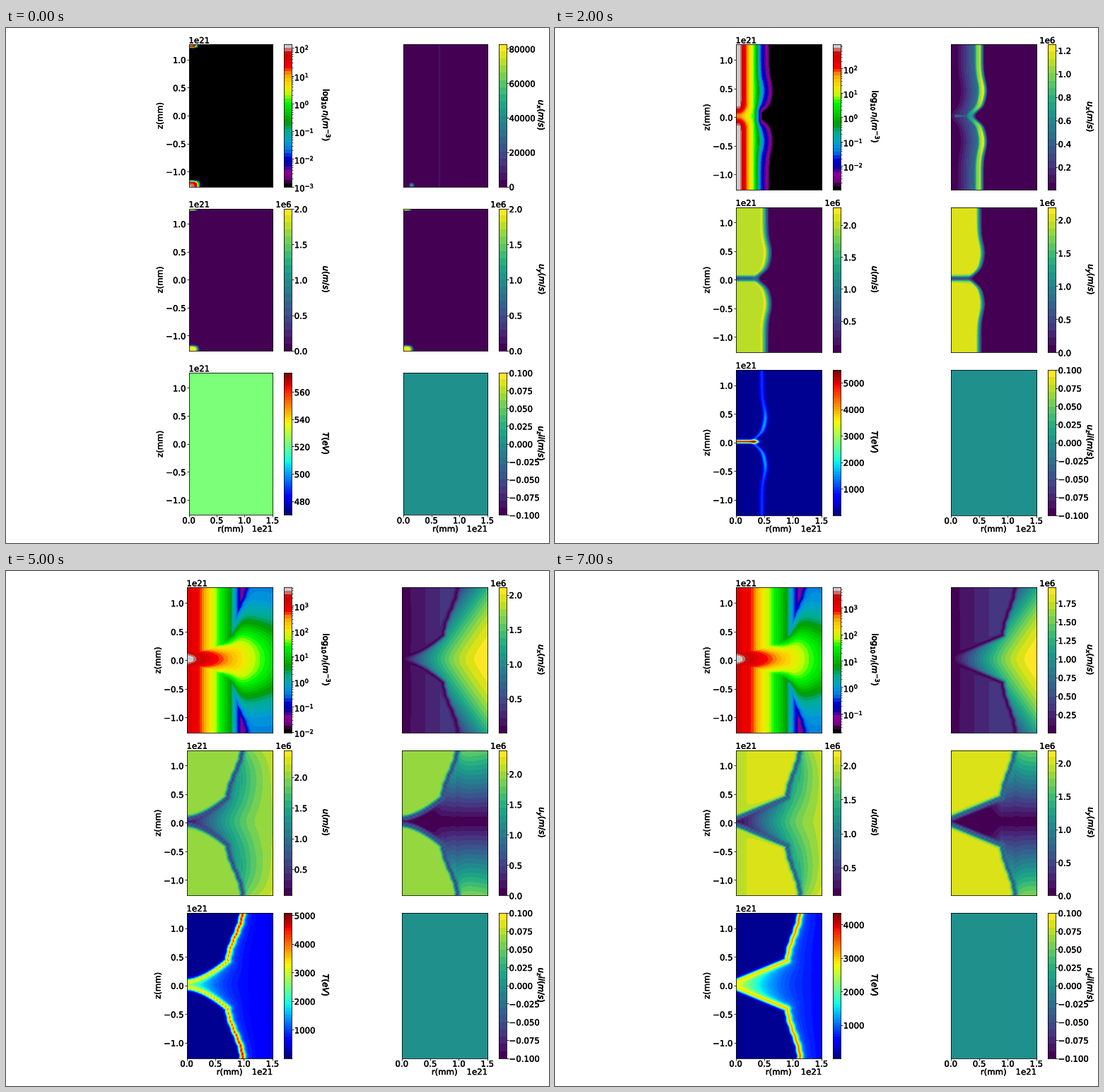
These frames come from a looping animation (768x729 px, 8 s). A matplotlib script:

```python
import numpy as np
import matplotlib.pyplot as plt
from matplotlib.animation import FuncAnimation
from matplotlib.patheffects import withStroke
from matplotlib.text import Text

W, H, DPI = 768, 729, 96
PT = 72 / DPI
plt.rcParams.update({
    "font.family": "DejaVu Sans", "font.size": 11.7 * PT,
    "axes.linewidth": 0.8 * PT, "mathtext.fontset": "dejavusans"})
fig = plt.figure(figsize=(W / DPI, H / DPI), dpi=DPI, facecolor="white")

# Grid: radius and height above the collision plane, 81 cells per axis unit
NX, NY, ZMAX, SCALE = 122, 206, 1.27, 81
r, z = np.meshgrid(np.arange(NX) + 0.5, (NY - 1) / 2 - np.arange(NY))
y = np.abs(z - 1.5)


def gauss(x):
    return np.exp(-x ** 2)


def sig(x):
    return 1 / (1 + np.exp(-np.clip(x, -50, 50)))


def mix(a, b, s):
    return a * (1 - s) + b * s


def limits(t):
    """Colour bar ranges: density exponent, ux, u, uy, temperature."""
    if t == 0:
        return (-3, 2.13), (0, 82500), (0, 2.003), (0, 2.003), (470, 574)
    if t < 3:
        return ((-2.99, 2.19 + .4 * t), (.004, .45 + .4 * t),
                (.005, 1.94 + .17 * t), (0, 1.91 + .14 * t),
                (8, 3990 * t - 2490))
    age = max(t - 3, 1)
    ux = 1.885 + 2.22 / (t - 2) ** 2.1
    u = max(ux, 2.12 + .97 / age ** 1.6)
    uy = 2.1 + .88 / age ** 1.6
    temp = 4350 + 5370 * gauss((t - 3) / 1.42)
    n_lo = -2.99 if t == 3 else -1.45 - 1.2 / age ** 1.05
    u_lo = .005 if t == 3 else .02 + .01 * t
    return (n_lo, 3.58 + .027 * t), (.004, ux), (u_lo, u), (0, uy), (8, temp)


def inflow():
    """Two beams just entering at the top and bottom."""
    def spot(width, height, edge):
        return ((r / width) ** 4 + (edge / height) ** 4) ** 0.25

    up, down = z.max() - z, z - z.min()
    q = np.minimum(spot(16, 9.5, down), spot(13, 5, up))
    n = np.interp(q, [0, .5, .7, .9, 1.05], [.99, .95, .86, .5, 0])
    q = np.minimum(spot(14.5, 8, down), spot(13, 3.5, up))
    uy = np.interp(q, [.65, 1.05], [1, 0])
    ux = .06 * (np.abs(r - 52) < 1.5) + .6 * gauss(np.hypot(r - 12, down - 2) / 2.8)
    return n, ux, uy, np.full(r.shape, .5)


def beams(t):
    """Beams on their way, then touching in the middle."""
    neck = t - 1
    if neck:
        shift = 5 * gauss((y - 36) / 20) - 12 * gauss(y / 10)
        x, xn = r - shift, r - shift * np.clip((r - 25) / 15, 0, 1)
    else:
        x = xn = np.hypot(r, 1.3 * np.maximum(0, 45 - y)) / .85
    n = np.interp(xn, [5, 13, 26, 36, 45, 48], [1, .85, .6, .2, .08, 0])
    mid = np.interp(r, [0, 8, 25, 37], [.8, .78, .6, 0])
    n = mix(n, mid, neck * gauss(y / 9))
    ux = np.interp(x, [0, 10, 33, 36, 41, 47], [0, .05, .35, .75, .88, 0])
    ux = ux * (1 + neck * (.1 * gauss((y - 36) / 18) - .35 * gauss(y / 10)))
    ux = np.maximum(ux, neck * .33 * gauss(y / 2.5) * ((r > 5) & (r < 32)))
    uy = np.interp(x, [0, 36, 40, 44], [.93, .9, .45, 0])
    uy = uy * (1 - .75 * neck * gauss(y / 3.3))
    temp = .02 + .16 * gauss((x - 36.5) / 3.6) * (1 + .7 * gauss((y - 25) / 20))
    temp = temp + .88 * neck * gauss(y / 2.4) * sig((31 - r) / 1.5)
    return n, ux, uy, temp


def shock_front(t, edge):
    """Wedge from the axis up to a knee, then a dome or a rising sheet."""
    knee_r, knee_h = edge - 26 + 1.4 * t, 34
    s = np.linspace(0, 1, 20)
    wedge_h = 4 + (knee_h - 4) * s ** (1 + (7 - t) / 3)
    if t == 3:
        tail_r, tail_h = [52, 60, 78, 100, 122], [52, 57, 57, 47, 30]
    else:
        e = np.linspace(.03, 1, 30)
        tail_h = knee_h + 76 * e
        e = np.minimum(e * 1.1, 1)
        tail_r = knee_r + (edge - knee_r) * e * e * (3 - 2 * e)
        tail_r = tail_r + .5 * np.sin(tail_h / 2.2) + .02 * (tail_h - knee_h)
    return np.append(knee_r * s, tail_r), np.append(wedge_h, tail_h)


def distance(pr, ph):
    best = np.full(r.shape, 1e9)
    for a, b, c, d in zip(pr, ph, pr[1:], ph[1:]):
        dx, dy = c - a, d - b
        s = np.clip(((r - a) * dx + (y - b) * dy) / (dx * dx + dy * dy), 0, 1)
        best = np.minimum(best, np.hypot(r - a - s * dx, y - b - s * dy))
    return best


def outflow(t, uy_max):
    """Plasma thrown outwards behind a shock front."""
    early = t == 3
    edge = 70 * (t / 4) ** .43
    pr, ph = shock_front(t, edge)
    h = np.interp(r, np.maximum.accumulate(pr), ph, right=300)
    gap = distance(pr, ph)
    d = np.where(y < h, gap, -gap)
    inner = sig(d / 1.5)
    soft = sig((d - 2.5) / 1.8) if early else inner
    line = gauss(gap / 3.2)
    beads = .05 * np.sin((r + y) * .9)
    x, rise = r / NX, np.minimum(y / h, 1)
    stripe = early & (r > 60) & (r < 82)

    # Density: layered beam plus a tongue along the mid plane
    n = np.interp(r / edge, [0, .2, .8, 1.06], [.9, .86, .46, 0])
    if early:
        n = np.maximum(n, .07 * stripe)
        fan = mix(1 - .75 * x, .08, rise ** 1.7) * sig((d + 2) / 1.2)
    else:
        base = .27 * sig((r - np.interp(y, ph, pr) - 4) / 3)
        width = 27 + 33 * sig((r - edge + 8) / 6)
        fan = mix(base, 1 - .45 * x, np.exp(-(y / width) ** 2.4))
    n = np.maximum(n, fan)
    n = np.maximum(n, gauss(np.hypot(r / 2, y) / 18) ** .3 * (r < 9) * (y < 5))

    # Radial speed
    out = np.minimum(.02 + .0024 * r, .17)
    if early:
        out = np.where(r > 82, .02, np.maximum(out, .2 * stripe))
        ux = mix(out, x ** .9 * (1 - .4 * rise ** 3), sig((d - 3) / 2.2))
        ux = ux * (1 - .5 * line * (r < 60))
    else:
        back = .72 * (np.hypot(y, 8) - 8)
        grow = np.sin(np.pi / 2 * np.maximum(r - back, 0) / NX)
        ux = mix(out, .98 * grow ** (.5 + .09 * t), inner)
        ux = mix(ux, .04, line)

    # Axial speed
    decay = np.exp(-np.maximum(r - 60, 0) / (100 * 2 ** (t - 3)))
    fan = (.8 + .3 * gauss((t - 3) / 1.5)) * sig((r - edge + 12) / 8) * decay
    fan = fan * np.minimum(y / np.minimum(h, 100), 1.1)
    fall = np.interp(r, [54, 58, 68, 86], [1, .6, .5, 0]) if early else 1
    uy = mix(2 / uy_max * fall, fan, soft)
    dark = .1 + .03 * t + beads
    uy = mix(uy, dark, line * (sig((59 - r) / 2) if early else 1))

    # Temperature: hot along the front, warm near the axis
    warm = .1 + (.03 + .07 * t) * np.exp(-r / (10 + 5 * t))
    warm = warm + .12 * np.exp(-gap / 8) * (not early)
    temp = mix(.02 + .09 * stripe, warm, inner)
    along = x if early else np.minimum(y / 100, 1)
    peak = .35 + .31 * sig((t - 4.5) * 4) + .5 / max(t - 3, 1) * along
    temp = mix(temp, peak + beads * (t < 6), gauss(gap / 3.9))
    return n, ux, uy, temp


def fields(t, lim):
    if t == 0:
        n, ux, uy, temp = inflow()
    elif t < 3:
        n, ux, uy, temp = beams(t)
    else:
        n, ux, uy, temp = outflow(t, lim[3][1])
    ux_max = lim[1][1] if t else 0
    u = np.hypot(ux * ux_max, uy * lim[3][1]) / lim[2][1]
    return n, ux, u, uy, temp, np.full(r.shape, .5)


def bands(v, count):
    return np.clip(np.floor(v * count), 0, count - 1) / (count - 1)


def box(x0, top, x1, bottom):
    return fig.add_axes([x0 / W, 1 - bottom / H, (x1 - x0) / W, (bottom - top) / H])


def note(x, y_px, text, **kw):
    fig.text(x / W, 1 - y_px / H, text, **kw)


def ticks(axis, values, digits):
    labels = [f"{v + 0.0:.{digits}f}".replace("-", "\u2212") for v in values]
    axis.set_ticks(values, labels)


def style(ax):
    ax.tick_params(length=3 * PT, width=.8 * PT, pad=1 * PT)
    ax.tick_params(axis="x", pad=-1 * PT)
    ax.tick_params(which="minor", length=1.8 * PT, width=.6 * PT)


def linear_ticks(axis, lo, hi):
    """At most eight round steps."""
    base = 10 ** np.floor(np.log10((hi - lo) / 8))
    step = next(base * m for m in (1, 2, 2.5, 5, 10)
                if (hi - lo) / (base * m) <= 8.0001)
    digits = next(k for k in range(5)
                  if abs(step * 10 ** k - round(step * 10 ** k)) < 1e-6)
    first, last = np.ceil(lo / step - 1e-6), np.floor(hi / step + 1e-6)
    ticks(axis, np.arange(first, last + 1) * step, digits)


def log_ticks(ax, lo, hi):
    powers = np.arange(np.ceil(lo), np.floor(hi) + 1)
    ax.yaxis.set_ticks(powers, [f"$10^{{{int(p)}}}$" for p in powers])
    minor = [p + np.log10(k) for p in range(-4, 4) for k in range(2, 10)]
    ax.set_yticks([m for m in minor if lo <= m <= hi], minor=True)


def bar(x, top, bottom, lo, hi, cmap, count):
    ax = box(x, top, x + 10.5, bottom)
    ramp = bands((np.arange(400)[:, None] + .5) / 400, count)
    ax.imshow(ramp, cmap=cmap, vmin=0, vmax=1, aspect="auto",
              origin="lower", extent=[0, 1, lo, hi], interpolation="nearest")
    ax.set_xticks([])
    ax.yaxis.tick_right()
    if cmap == "nipy_spectral":
        log_ticks(ax, lo, hi)
    else:
        linear_ticks(ax.yaxis, lo, hi)
    style(ax)


def panel(x0, x1, top, bottom, v, cmap, count, left, last):
    ax = box(x0, top, x1, bottom)
    ax.imshow(v if np.ptp(v) == 0 else bands(v, count), cmap=cmap,
              vmin=0, vmax=1, aspect="auto", interpolation="bilinear",
              extent=[0, NX / SCALE, -ZMAX, ZMAX])
    ax.set_xticks([])
    ax.set_yticks([])
    if left:
        ticks(ax.yaxis, [-1, -.5, 0, .5, 1], 1)
        note(x0, top - 1.8, "1e21", va="baseline")
        note(x0 - 40.5, (top + bottom) / 2, "z(mm)", rotation=90,
             ha="center", va="center")
    if last:
        ticks(ax.xaxis, [0, .5, 1, 1.5], 1)
        note((x0 + x1) / 2, 713, "r(mm)", ha="center", va="baseline")
        note(x1, 713, "1e21", ha="right", va="baseline")
    style(ax)


PANELS = [("nipy_spectral", 42, r"$\log_{10}n_i(m^{-3})$"),
          ("viridis", 20, "$u_x(m/s)$"),
          ("viridis", 20, "$u(m/s)$"),
          ("viridis", 20, "$u_y(m/s)$"),
          ("jet", 60, "$T(eV)$"),
          ("viridis", 20, "$u_zii(m/s)$")]


def draw(t):
    fig.clear()
    lim = limits(t) + ((-.1, .1),)
    k = min(t, 2) / 2
    height = 201.2 + 4.6 * k
    pitch = 232.35 - 2.1 * k
    for i, (v, (lo, hi), (cmap, count, label)) in enumerate(
            zip(fields(t, lim), lim, PANELS)):
        row, col = divmod(i, 2)
        top = 23.3 + pitch * row
        bottom = top + height
        x0, x1 = (562 - 2.3 * k, 681.3) if col else (258.5 - 3 * k, 377.4)
        panel(x0, x1, top, bottom, v, cmap, count, col == 0, row == 2)
        x_bar = 697 if col else 393.2
        bar(x_bar, top, bottom, lo, hi, cmap, count)
        if cmap == "viridis" and 1 < hi < 10:
            note(x_bar + 10.5, top - 1.8, "1e6", ha="right", va="baseline")
        elif i == 1 and hi < 1:
            note(x_bar + 10.5, top - 1.8, "1e6", ha="right", va="baseline")
        note(757 if col else 452.5, (top + bottom) / 2, label, rotation=270,
             ha="center", va="center")
    for text in fig.findobj(Text):
        weight = .65 if text.get_rotation() == 270 else .35
        text.set_path_effects([withStroke(linewidth=weight * PT, foreground="black")])
    return []


anim = FuncAnimation(fig, draw, frames=8, interval=1000, repeat=True,
                     repeat_delay=0, init_func=lambda: [])
plt.show()
```
